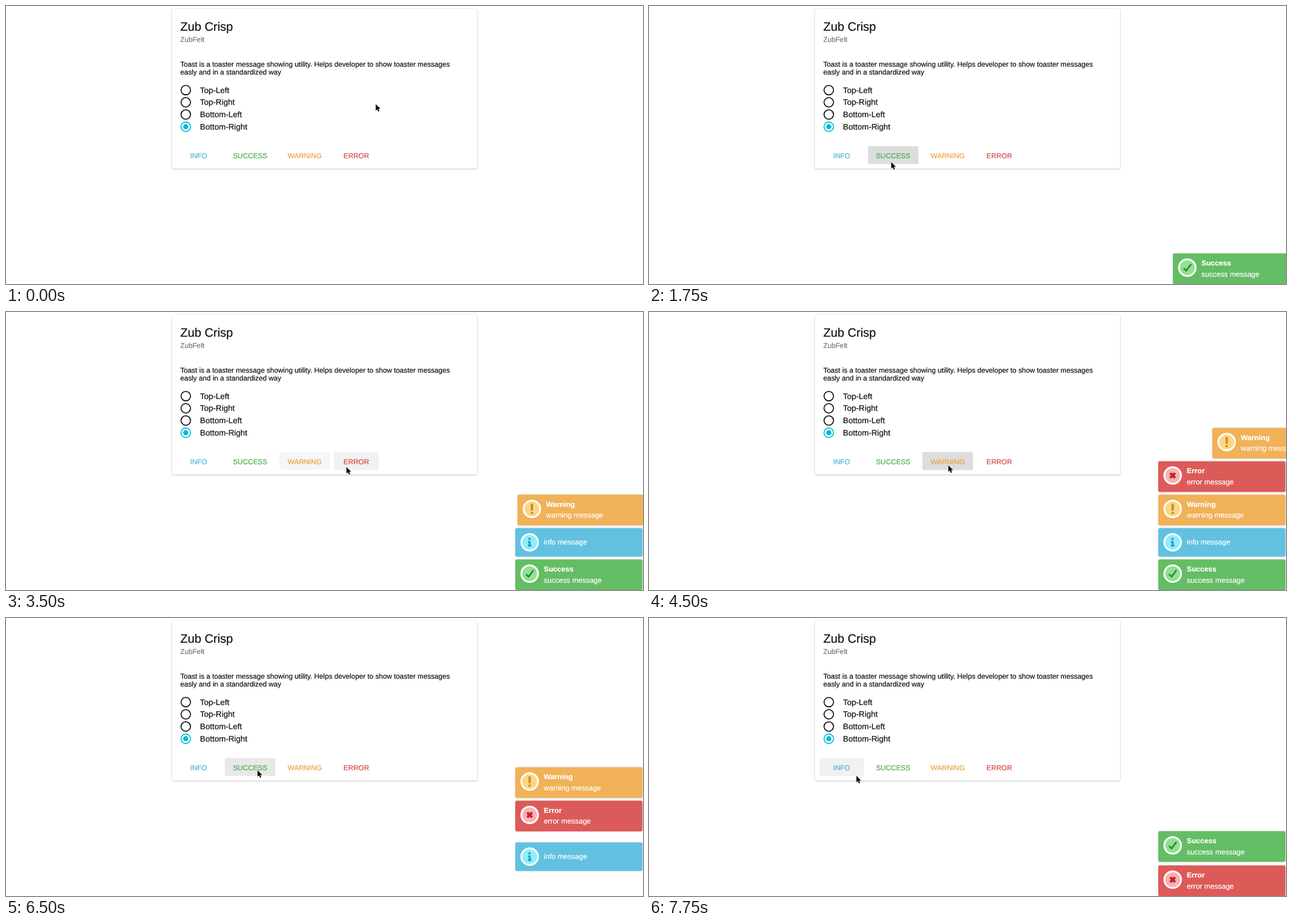
Write an HTML page that moves like this. It is 1132x495 px and loops after 8000 ms.

```html
<!DOCTYPE html>
<html lang="en">
<head>
<meta charset="utf-8">
<title>Toast demo</title>
<style>
  html, body { margin: 0; width: 100%; height: 100%; overflow: hidden; background: #fff; }
  svg { display: block; width: 1132px; height: 495px; overflow: hidden; }
  text {
    font: 12.62px "Liberation Sans", Arial, sans-serif; text-rendering: geometricPrecision; white-space: pre;
    color: #111; fill: currentColor; stroke: currentColor; stroke-width: .22px;
  }
  .card { fill: #fff; filter: drop-shadow(0 1px 1.6px rgba(0,0,0,.2)) drop-shadow(0 0 1px rgba(0,0,0,.1)); }
  .title { font-size: 21.6px; }
  .sub { color: #757575; }
  .option { font-size: 14.4px; }
  .button { text-anchor: middle; }
  .toast rect { filter: drop-shadow(0 0 2px rgba(0,0,0,.12)); }
  .toast text { font-size: 12.96px; color: #fff; }
  .toast .head { font-weight: bold; }
</style>
</head>
<body>
<svg id="stage" viewBox="0 0 1132 495"></svg>
<script>
const LOOP = 8000, STEP = 250;
const TOAST_X = 905, TOAST_W = 226, GAP = 4.8;
const SLIDE_IN = 400, SLIDE_OUT = 300, DROP = 200;
const stage = document.getElementById('stage');

function add(parent, tag, attrs = {}, content = '') {
  const node = document.createElementNS('http://www.w3.org/2000/svg', tag);
  for (const key in attrs) node.setAttribute(key, attrs[key]);
  node.textContent = content;
  return parent.appendChild(node);
}
const label = (parent, x, y, cls, content) => add(parent, 'text', { x, y, class: cls }, content);
const clamp = v => Math.min(1, Math.max(0, v));
const smooth = k => k * k * (3 - 2 * k);

const kinds = {
  info: { color: '#46b4d8', fill: '#62c1e0', tint: '#8ceeff', ink: '#3598b8', life: 4664,
    width: 3.4, mark: 'M-.3-8V-4.2M-3-.6H0M0-2V7.4M-3 6H3' },
  success: { color: '#4aad4a', fill: '#64bd65', tint: '#8fe291', ink: '#2d8a38', life: 4664,
    width: 3, mark: 'M-6.5 .8L-2 5.4 6.8-6.2' },
  warning: { color: '#ee9f3c', fill: '#f1b158', tint: '#fcd683', ink: '#c98a2e', life: 2895,
    width: 4, mark: 'M0-9V3.2M0 5.6V9.2' },
  error: { color: '#d64541', fill: '#dc5b59', tint: '#ffafb1', ink: '#b42c2e', life: 4664,
    width: 4.4, mark: 'M-4.3-4.3L4.3 4.3M4.3-4.3L-4.3 4.3' }
};

// Card
add(stage, 'rect', { x: 295, y: 5, width: 542, height: 284.5, rx: 2, class: 'card' });
label(stage, 309.7, 43.5, 'title', 'Zub Crisp');
label(stage, 309.7, 64, 'sub', 'ZubFelt');
label(stage, 309.7, 107.5, '', 'Toast is a toaster message showing utility. Helps developer to show toaster messages');
label(stage, 309.7, 122, '', 'easly and in a standardized way');

['Top-Left', 'Top-Right', 'Bottom-Left', 'Bottom-Right'].forEach((name, i) => {
  const cy = 149.8 + i * 21.7, checked = i === 3;
  const color = checked ? '#00bcd4' : '#111';
  add(stage, 'circle', { cx: 319.5, cy, r: 8.4, fill: 'none', stroke: color, 'stroke-width': 1.8 });
  if (checked) add(stage, 'circle', { cx: 319.5, cy, r: 4.6, fill: color });
  label(stage, 344.8, cy + 4.8, 'option', name);
});

let left = 302.5;
const buttons = Object.keys(kinds).map(kind => {
  const width = kind.length > 5 ? 89.8 : 79.4, x = left;
  const node = add(stage, 'rect', { x, y: 249.5, width, height: 32, rx: 2 });
  label(stage, x + width / 2, 271, 'button', kind.toUpperCase()).style.color = kinds[kind].color;
  left += width + 7.1;
  return { kind, x, width, node };
});

function makeToast(kind, start) {
  const k = kinds[kind], plain = kind === 'info', height = plain ? 51 : 54.7;
  const node = add(stage, 'g', { class: 'toast' });
  add(node, 'rect', { width: TOAST_W, height, rx: 3, fill: k.fill });
  const icon = add(node, 'g', { transform: 'translate(25.6 25.4)' });
  add(icon, 'circle', { r: 14.8, fill: k.tint, stroke: '#fff', 'stroke-width': 3.2 });
  add(icon, 'path', { d: k.mark, fill: 'none', stroke: k.ink, 'stroke-width': k.width });
  if (plain) {
    label(node, 50.8, 29.8, '', 'info message');
  } else {
    label(node, 50.8, 21.8, 'head', kind[0].toUpperCase() + kind.slice(1));
    label(node, 50.8, 41, '', kind + ' message');
  }
  return { node, kind, height, start, end: start + k.life };
}
const toasts = [
  makeToast('success', 1486), makeToast('info', 2586), makeToast('warning', 3155),
  makeToast('error', 3850), makeToast('warning', 4360), makeToast('success', 6997)
];

// Pointer stops, eased in between: [time, x, y]
const stops = [
  [0, 657, 174.7], [1000, 433, 282.5], [1250, 433, 282.5], [1750, 430.5, 278], [2250, 350, 273],
  [2600, 350, 273], [3250, 530, 273], [3500, 605, 276], [4000, 610, 274], [4500, 532, 273],
  [5250, 531, 273], [6000, 447, 271], [6750, 447, 271], [7250, 379.7, 201], [7750, 368.6, 281]
];
const pointer = add(stage, 'path', {
  d: 'M0 0V11.6L2.7 9.2 4.5 13.4 6.5 12.5 4.7 8.4H8.3Z',
  stroke: '#fff', 'stroke-width': 1, 'paint-order': 'stroke'
});

function pointerAt(t) {
  const next = stops.findIndex(s => s[0] > t);
  if (next < 1) return stops[next ? stops.length - 1 : 0].slice(1);
  const [t0, x0, y0] = stops[next - 1], [t1, x1, y1] = stops[next];
  const k = smooth((t - t0) / (t1 - t0));
  return [x0 + (x1 - x0) * k, y0 + (y1 - y0) * k];
}

function hovered(button, t) {
  const [x, y] = pointerAt(t);
  return x > button.x && x < button.x + button.width && y > 249.5 && y < 281.5;
}

function drawButton(button, t) {
  const now = hovered(button, t), before = hovered(button, t - STEP);
  const pressed = now && toasts.some(({ kind, start }) =>
    kind === button.kind && t > start && t < start + 300);
  button.node.setAttribute('fill-opacity', .055 * now + .035 * before + .045 * pressed);
}

function drawToasts(t) {
  let floor = 495.2;
  for (const { node, height, start, end } of toasts) {
    const age = t - start, gone = t - end;
    node.style.display = age >= 0 && gone < SLIDE_OUT ? '' : 'none';
    if (age < 0) continue;
    const shift = (1 - clamp(age / SLIDE_IN)) ** 2 + clamp(gone / SLIDE_OUT) ** 2;
    const x = Math.round(TOAST_X + (TOAST_W + 1) * shift);
    node.setAttribute('transform', `translate(${x} ${floor - height})`);
    // The stack closes up once a toast has left.
    floor -= (height + GAP) * (1 - clamp((gone - SLIDE_OUT) / DROP));
  }
}

const origin = performance.now();
function tick() {
  const elapsed = (performance.now() - origin) % LOOP;
  const t = Math.floor(elapsed / STEP) * STEP;
  buttons.forEach(button => drawButton(button, t));
  drawToasts(t);
  pointer.setAttribute('transform', `translate(${pointerAt(t)})`);
  requestAnimationFrame(tick);
}
tick();
</script>
</body>
</html>
```
